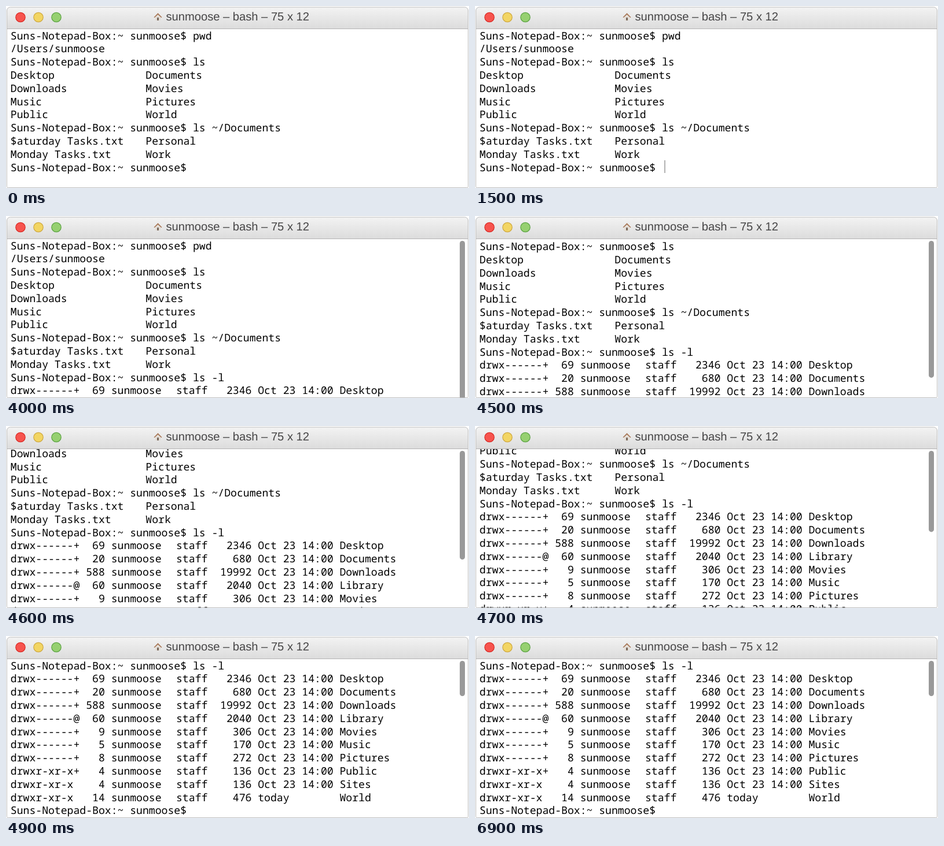
Animation, 800 px wide and 315 px high, one loop 7.4 s. Source, as an HTML page with a canvas:

```html
<!DOCTYPE html>
<html lang="en">
<head>
<meta charset="utf-8">
<title>Terminal</title>
<style>
  html, body { margin: 0; width: 800px; height: 315px; overflow: hidden; background: #fff; }
  canvas { display: block; }
</style>
</head>
<body>
<canvas id="stage" width="800" height="315"></canvas>
<script>
const ctx = document.getElementById('stage').getContext('2d');
ctx.textRendering = 'geometricPrecision';

const LOOP = 7400, LEFT = 7.8, BASE = 57.5, LINE = 22.8, CHAR = 10.88;
const USER = 'sunmoose';
const PROMPT = `Suns-Notepad-Box:~ ${USER}$ `;
const COMMAND = 'ls -l';
const SCROLL = [44, 95, 145, 188, 228];

// Each line is a list of [text, x] pieces.
const line = text => [[text, LEFT]];
const pair = (a, b) => [[a, LEFT], [b, 241.3]];
const entry = (mode, links, size, name, date = 'Oct 23 14:00') => [
  [mode.padEnd(11) + String(links).padStart(4) + ' ' + USER, LEFT],
  [`staff ${String(size).padStart(6)} ${date.padEnd(12)} ${name}`, 294]
];

const history = [
  line(PROMPT + 'pwd'),
  line('/Users/' + USER),
  line(PROMPT + 'ls'),
  pair('Desktop', 'Documents'),
  pair('Downloads', 'Movies'),
  pair('Music', 'Pictures'),
  pair('Public', 'World'),
  line(PROMPT + 'ls ~/Documents'),
  pair('$aturday Tasks.txt', 'Personal'),
  pair('Monday Tasks.txt', 'Work')
];
const listing = [
  entry('drwx------+', 69, 2346, 'Desktop'),
  entry('drwx------+', 20, 680, 'Documents'),
  entry('drwx------+', 588, 19992, 'Downloads'),
  entry('drwx------@', 60, 2040, 'Library'),
  entry('drwx------+', 9, 306, 'Movies'),
  entry('drwx------+', 5, 170, 'Music'),
  entry('drwx------+', 8, 272, 'Pictures'),
  entry('drwxr-xr-x+', 4, 136, 'Public'),
  entry('drwxr-xr-x', 4, 136, 'Sites'),
  entry('drwxr-xr-x', 14, 476, 'World', 'today'),
  line(PROMPT)
];

function fill(color, path) {
  ctx.fillStyle = color;
  ctx.beginPath();
  path();
  ctx.fill();
}

function polygon(color, ...points) {
  fill(color, () => points.forEach(([x, y]) => ctx.lineTo(x, y)));
}

function drawTitleBar() {
  const shade = ctx.createLinearGradient(0, 2, 0, 39);
  shade.addColorStop(0, '#f3f3f3');
  shade.addColorStop(1, '#dcdcdc');
  fill(shade, () => ctx.roundRect(1, 2, 798, 37, [6, 6, 0, 0]));
  ctx.fillStyle = '#b4b3b4';
  ctx.fillRect(1, 39, 798, 1);

  [['#f7544e', '#d92b25'], ['#f2d563', '#cfa840'], ['#96d070', '#5da344']].forEach(([color, rim], i) => {
    fill(color, () => ctx.arc(25 + 31 * i, 19.5, 8.2, 0, 7));
    ctx.strokeStyle = rim;
    ctx.lineWidth = 1.2;
    ctx.stroke();
  });

  polygon('#e3ded8', [258, 18.5], [262.5, 14], [267, 18.5], [267, 25], [258, 25]);
  polygon('#a5714f', [255.5, 19.5], [262.5, 12.3], [269.5, 19.5], [268.3, 20.3], [262.5, 14.8], [256.7, 20.3]);
  polygon('#7d6a5c', [261, 20], [264, 20], [264, 25], [261, 25]);

  ctx.font = '20.15px "Liberation Sans", Arial, sans-serif';
  ctx.fillStyle = '#464546';
  ctx.fillText(`${USER} – bash – 75 x 12`, 276.5, 25);
}

function drawFrame() {
  ctx.strokeStyle = '#bdbdbd';
  ctx.lineWidth = 1;
  ctx.beginPath();
  ctx.roundRect(1.5, 2, 797, 312.5, [6, 6, 2, 2]);
  ctx.stroke();
}

function drawCursor(x, row, scroll) {
  ctx.fillStyle = '#666';
  ctx.fillRect(x, BASE + row * LINE - scroll - 18.5, 1, 22);
}

function draw(t) {
  const listed = t >= 4000;
  const typed = t < 2500 ? 0 : Math.min(5, Math.floor((t - 2500) / 100));
  const scroll = t < 4500 ? 0 : SCROLL[Math.min(4, Math.floor((t - 4500) / 100))];
  const rows = [...history, line(PROMPT + COMMAND.slice(0, typed)), ...(listed ? listing : [])];

  ctx.fillStyle = '#fff';
  ctx.fillRect(0, 0, 800, 315);

  ctx.save();
  ctx.beginPath();
  ctx.rect(2, 40, 796, 274);
  ctx.clip();
  ctx.font = '18.13px "Noto Sans Mono", monospace';
  ctx.fillStyle = '#000';
  rows.forEach((pieces, row) => {
    for (const [text, x] of pieces) ctx.fillText(text, x, BASE + row * LINE - scroll);
  });

  const blink = Math.floor(t / 500) % 2 === 1;
  if (t < 2500 ? blink : t < 3000) drawCursor(327.5 + typed * CHAR, 10, scroll);
  if (t >= 4900 && Math.floor((t - 4900) / 500) % 2 === 1) drawCursor(319.5, 21, scroll);

  if (listed) fill('#999', () => ctx.roundRect(784, 43, 9, 279 - 0.956 * scroll, 4.5));
  ctx.restore();

  drawTitleBar();
  drawFrame();
}

function tick() {
  draw(performance.now() % LOOP);
  requestAnimationFrame(tick);
}
tick();
</script>
</body>
</html>
```
